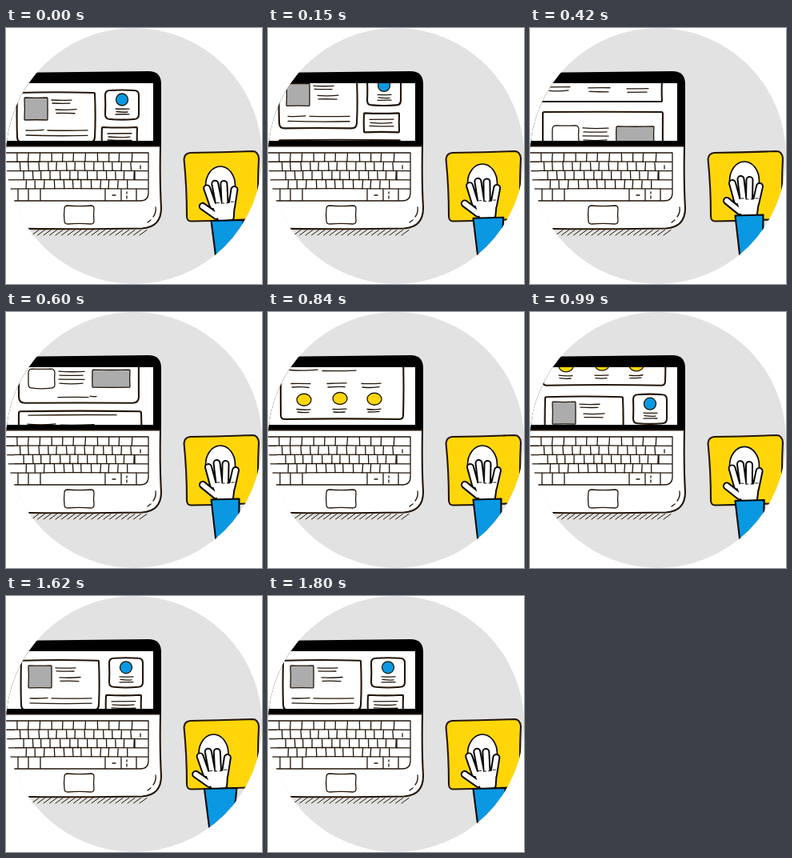
Animation of 320x320 px, one loop 4.77 s. Source, as an HTML page:

```html
<!DOCTYPE html>
<html>
<head>
<meta charset="utf-8">
<style>
html, body { margin: 0; width: 100%; height: 100%; overflow: hidden; background: #fff }
svg { display: block; width: 100%; height: 100% }
.ink { fill: none; stroke: #23160a; stroke-width: 2.1; stroke-linecap: round; stroke-linejoin: round }
.thin { stroke-width: 1.3 }
.white { fill: #fff }
.gray { fill: #acacac }
.blue { fill: #0a98e2 }
.yellow { fill: #ffd60a }
</style>
</head>
<body>
<svg viewBox="0 0 320 320">
  <defs>
    <clipPath id="disc"><circle cx="160" cy="160" r="160"/></clipPath>
    <clipPath id="screen"><path d="M0 69H184V141H0Z"/></clipPath>
  </defs>
  <g clip-path="url(#disc)">
    <path fill="#e2e2e2" d="M0 0H320V320H0Z"/>
    <path d="M0 56L178 54Q194 54 194 70V150H0Z"/>
    <path class="white" d="M0 69H184V141H0Z"/>
    <g clip-path="url(#screen)">
      <g id="page" class="ink">
        <g id="intro"></g>
        <use href="#intro" x="5" y="279"/>
        <g id="rest"></g>
      </g>
    </g>
    <path d="M0 141H194V148H0Z"/>
    <path class="ink white" d="M-5 147.500H193Q192 190 194 225Q194 249 170 250.500Q90 252 -5 250.500Z"/>
    <path id="keys" class="ink thin"/>
    <g id="pad" class="ink thin"></g>
    <path class="ink thin" d="M187 224Q188 231 184 236M181 240L177 243"/>
    <path id="hatch" class="ink" style="stroke-width:1"/>
    <path class="ink yellow" d="M230 156Q270 155.500 308 154Q315 154 316 163Q314 200 316 232Q316 240 309 239Q270 241 232 241.500Q226 242 226 235Q226 198 222.500 164Q223 157 230 156Z"/>
    <g id="arm" class="ink" style="stroke:#080808">
      <ellipse id="mouse" class="white" cx="268" cy="191" rx="18.500" ry="24" style="stroke-width:1.700"/>
      <g id="hand"></g>
      <path id="sleeve" class="blue"/>
    </g>
  </g>
</svg>
<script>
const el = id => document.getElementById(id);
const clamp = x => Math.min(1, Math.max(0, x));
const smooth = x => (x = clamp(x)) * x * (3 - 2 * x);
const mix = (a, b, k) => a + (b - a) * k;

let seed = 7;
const random = () => (seed = seed * 16807 % 2147483647) / 2147483647;
const jitter = size => (random() - .5) * 2 * size;

// hand-drawn rectangle with slightly bent sides
function box(x, y, w, h, top = 1, bottom = top, style = '') {
  const bend = () => jitter(1.5);
  return `<path class="${style}" d="M${x + top} ${y}
    Q${x + w / 2} ${y + bend()} ${x + w - top} ${y} q${top} 0 ${top} ${top}
    Q${x + w + bend()} ${y + h / 2} ${x + w} ${y + h - bottom} q0 ${bottom} ${-bottom} ${bottom}
    Q${x + w / 2} ${y + h + bend()} ${x + bottom} ${y + h} q${-bottom} 0 ${-bottom} ${-bottom}
    Q${x + bend()} ${y + h / 2} ${x} ${y + top} q0 ${-top} ${top} ${-top}Z"/>`;
}

// rows of scribbled text
function lines(x, y, w, count = 1, gap = 4.5) {
  let d = '';
  for (let i = 0; i < count; i++) {
    d += `M${x + i % 2} ${y + i * gap}q${w / 2} ${jitter(1.5)} ${w - i % 2 * 3} ${jitter(.6)}`;
  }
  return `<path class="thin" d="${d}"/>`;
}

el('intro').innerHTML =
  box(14, 81, 97, 62, 1, 7) + box(23, 87, 29, 28, 1, 1, 'thin gray') +
  lines(57, 90, 25, 2, 4) + lines(62, 102, 26, 2) +
  lines(25, 128, 22) + lines(52, 128, 50) + lines(25, 134, 77) +
  box(124, 78, 42, 36, 6) + '<circle class="thin blue" cx="145" cy="89.5" r="7.5"/>' +
  lines(137, 101, 17, 3, 3.5) +
  box(120, 124, 44, 24) + lines(127, 132, 30, 3, 4);

const columns = [45, 90, 133];
el('rest').innerHTML =
  box(14, 158, 151, 27) +
  columns.map((x, i) => lines(x - 22 + i * 5, 167 + i, 27, 2)).join('') +
  box(16, 198, 150, 59.5, 2, 8) + box(28, 215, 33, 24, 5, 5, 'thin') +
  lines(66, 218, 32, 4, 5) + box(108, 216, 47, 22, 1, 1, 'thin gray') +
  lines(65, 250.5, 38) + lines(105, 249, 8) +
  box(16, 268, 153, 77.5, 2, 5) + lines(28, 273, 110) +
  lines(27, 284, 35) + lines(68, 285, 42) +
  columns.map(x => lines(x - 16, 301, 24, 2) +
    `<ellipse class="thin yellow" cx="${x}" cy="${320.5 + jitter(1)}" rx="9" ry="7.5"/>` +
    lines(x - 9, 333, 17, 2, 3.5)).join('');

// keyboard
const left = -5, right = 178;
let keys = `M${left} 156H${right}V206Q${right} 216 168 216H${left}`;
for (let row = 0; row < 5; row++) {
  const y = 156 + row * 11.3;
  if (row) keys += `M${left} ${y}Q80 ${y - 1} ${right} ${y}`;
  const step = row ? 11.6 : 14.4;
  for (let x = 13 + row * 4; row < 4 && x < 162; x += step) {
    keys += `M${x + jitter(1)} ${y}l${jitter(.8)} 11.3`;
  }
}
for (const x of [15, 28, 43, 124, 144, 163]) keys += `M${x} 201V216`;
keys += 'M161 179V190M168 172V176M133 209H137M151 205V207M151 210V213';
el('keys').setAttribute('d', keys);
el('pad').innerHTML = box(73, 222, 37, 23, 4);

let hatch = '';
for (let x = 36; x < 172; x += 7.5) hatch += `M${x + 5} 252.5L${x - 4} 259`;
el('hatch').setAttribute('d', hatch);

// fingers, thumb and palm: dark strokes with white ones on top
const hand = 'M253 194L259 216M263.500 189L266.500 214M274.500 190L274 214' +
  'M287 198L282 220M246 216L262 229M262 217H282L280 232H267Z';
el('hand').innerHTML =
  `<path d="${hand}" stroke-width="10"/>
   <path class="white" d="${hand}" stroke="#fff" stroke-width="6"/>
   <path stroke-width=".9" d="M264 213h3m3 1h3m3 0h3m3 -1h3"/>`;

function scrollAt(t) {
  const speed = .282, ease = 180;
  t = Math.min(t, 1080);
  return speed * (t < ease ? t * t / ease / 2 : t - ease / 2);
}

function draw(now) {
  const t = Math.floor(now % 4770 / 30) * 30;
  const down = 1 - smooth(t / 300) * smooth((1080 - t) / 130);
  const swing = Math.sin(Math.PI * clamp((t - 1380) / 420)) ** 2;
  const move = (id, value) => el(id).setAttribute('transform', value);
  move('page', `translate(0 ${-scrollAt(t)})`);
  move('arm', `translate(${-9 * swing} 0)`);
  move('mouse', `translate(0 ${6 * down})`);
  move('hand', `translate(${down} ${5 * down}) rotate(${-4 * down} 272 235)`);
  el('sleeve').setAttribute('d', `M${256.5} ${mix(234.5, 241, down)}
    L${mix(291.5, 297, down)} ${mix(233.5, 240, down)}L291 300H264Z`);
}

const start = performance.now();
function loop() {
  draw(performance.now() - start);
  requestAnimationFrame(loop);
}
loop();
</script>
</body>
</html>
```
